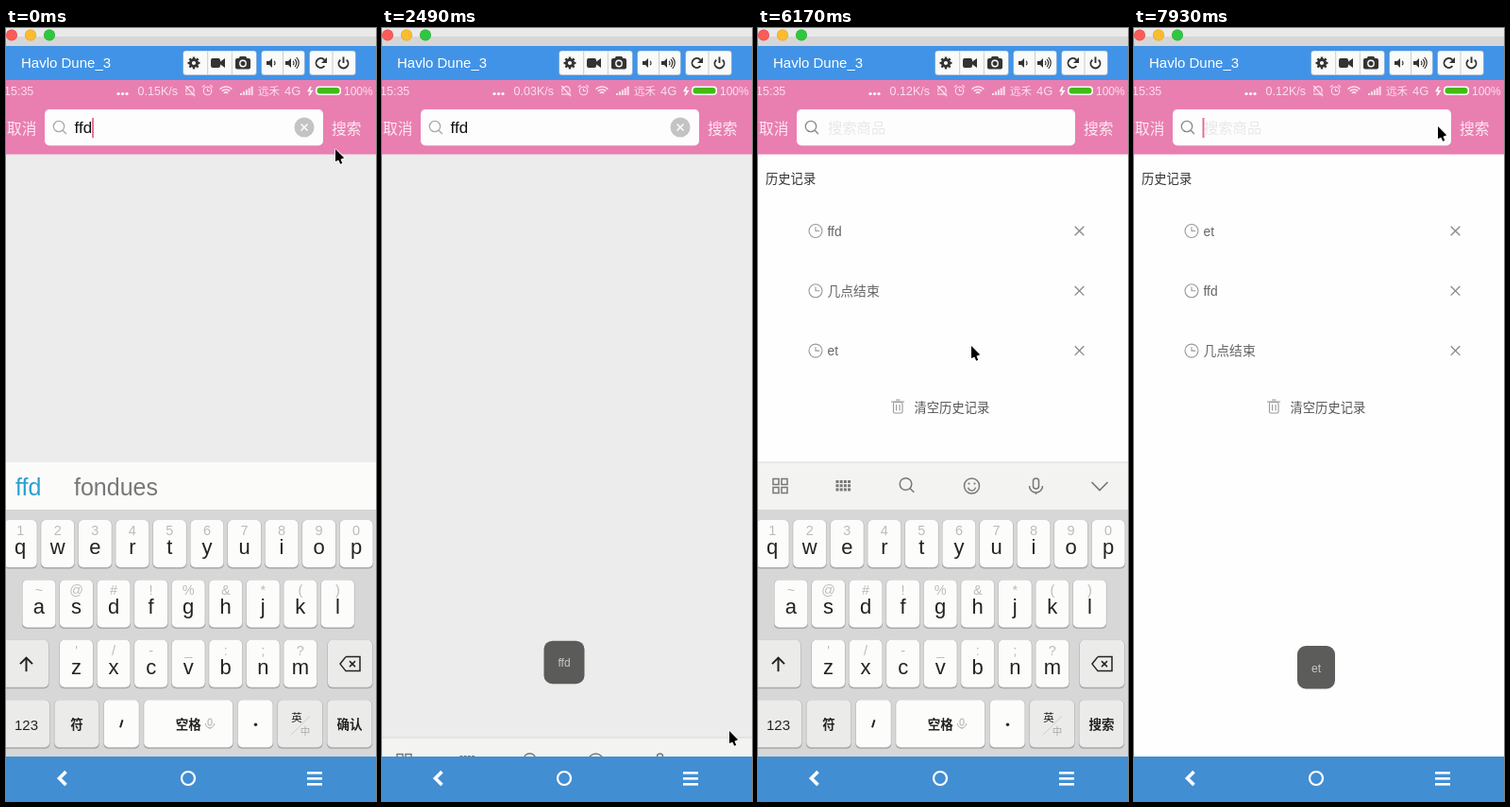
An HTML page with a canvas for the animation above (8 s loop, 392 by 817 pixels).

```html
<!DOCTYPE html>
<html lang="zh">
<head>
<meta charset="utf-8">
<title>Phone search</title>
<style>
html, body { margin: 0; width: 100%; height: 100%; overflow: hidden; background: #ececec; }
canvas { display: block; }
</style>
</head>
<body>
<canvas id="stage" width="392" height="817"></canvas>
<script>
const c = document.getElementById('stage').getContext('2d');
const FONT = '"Liberation Sans", "Noto Sans CJK SC", "Noto Sans CJK", sans-serif';
const LOOP = 8000, STEP = 146.8;   // the screen refreshes once per step

// Steps at which something is pressed
const COMMIT = 9, SUBMIT = 16, CLEAR = 29, PICK = 44, CLEAR_AGAIN = 53;

// ---------- helpers ----------
// Smooth 0..1 progress of k through a span of steps
function ease(k, from, span) {
  const u = Math.min(1, Math.max(0, (k - from) / span));
  return u * u * (3 - 2 * u);
}
function rect(x, y, w, h, color, r = 0) {
  c.beginPath();
  c.roundRect(x, y, w, h, r);
  c.fillStyle = color;
  c.fill();
}
function outline(x, y, w, h, color, width, r = 0) {
  c.beginPath();
  c.roundRect(x, y, w, h, r);
  c.strokeStyle = color;
  c.lineWidth = width;
  c.stroke();
}
function text(s, x, y, size, color, align = 'left', weight = 400) {
  c.font = `${weight} ${size}px ${FONT}`;
  c.textAlign = align;
  c.fillStyle = color;
  c.fillText(s, x, y);
}
function line(color, width, ...p) {
  c.beginPath();
  for (let i = 0; i < p.length; i += 2) c.lineTo(p[i], p[i + 1]);
  c.strokeStyle = color;
  c.lineWidth = width;
  c.stroke();
}
function poly(color, ...p) {
  c.beginPath();
  for (let i = 0; i < p.length; i += 2) c.lineTo(p[i], p[i + 1]);
  c.fillStyle = color;
  c.fill();
}
function dot(x, y, r, color) {
  c.beginPath();
  c.arc(x, y, r, 0, 7);
  c.fillStyle = color;
  c.fill();
}
// Arc centred on the direction `mid`, in degrees
function arc(x, y, r, color, width, mid = 0, sweep = 360) {
  const rad = Math.PI / 180;
  c.beginPath();
  c.arc(x, y, r, (mid - sweep / 2) * rad, (mid + sweep / 2) * rad);
  c.strokeStyle = color;
  c.lineWidth = width;
  c.stroke();
}
function cross(x, y, r, color, width) {
  for (const s of [r, -r]) line(color, width, x - r, y - s, x + r, y + s);
}
function magnifier(x, y, r, color, width) {
  arc(x, y, r, color, width);
  line(color, width, x + r * .7, y + r * .7, x + r * 1.4, y + r * 1.4);
}
function mic(x, y, s, color, width) {
  outline(x - 3 * s, y - 8 * s, 6 * s, 11 * s, color, width, 3 * s);
  arc(x, y, 7 * s, color, width, 90, 180);
  line(color, width, x, y + 7 * s, x, y + 9 * s);
}
function clock(x, y, r, color) {
  arc(x, y, r, color, 1.1);
  line(color, 1.1, x, y - r * .6, x, y, x + r * .6, y);
}

// ---------- window frame ----------
function gear(x, y, color) {
  arc(x, y, 3.6, color, 3);
  for (let a = 0; a < 360; a += 45) arc(x, y, 5.4, color, 2.2, a, 24);
}
function speaker(x, y, color, ...waves) {
  rect(x, y - 2, 4, 4, color);
  poly(color, x + 1, y, x + 6, y - 5, x + 6, y + 5);
  for (const r of waves) arc(x + 6, y, r, color, 1.2, 0, 92);
}
function buttonGroup(x, w, count) {
  rect(x - .5, 24, w + 1, 26, '#b9c8d8', 3);
  rect(x, 24.5, w, 24.5, '#fafafa', 3);
  for (let i = 1; i < count; i++) rect(x + w * i / count - .5, 24.5, 1, 24.5, '#ccc');
}
function titleBar() {
  const ink = '#333', y = 37;
  rect(0, 0, 392, 10, '#e9e9e9');
  rect(0, 9, 392, 10, '#d6d6d6');
  ['#fc5b57', '#fdbc30', '#2dc83f'].forEach((color, i) => {
    dot(6 + 20 * i, 7.5, 6, color);
    arc(6 + 20 * i, 7.5, 5.7, 'rgba(0,0,0,.12)', .8);
  });
  rect(0, 19, 392, 36, '#4193e7');
  text('Havlo Dune_3', 16, 42, 15, '#fff');
  buttonGroup(188, 77, 3);
  buttonGroup(271, 45, 2);
  buttonGroup(322, 48, 2);

  gear(199, y, ink);
  rect(217, y - 5, 10, 10, ink, 2);
  poly(ink, 225, y, 232, y - 5, 232, y + 5);
  rect(243, y - 5, 16, 11.5, ink, 2);
  rect(247, y - 7, 8, 4, ink, 1.5);
  arc(251, y + .5, 3.2, '#fafafa', 1.4);
  speaker(276, y, ink, 3);
  speaker(296, y, ink, 3, 5.7, 8.2);
  arc(333.5, y, 5, ink, 1.9, 180, 280);
  poly(ink, 340, y - 6, 340, y, 334, y);
  arc(357.5, y + .5, 5, ink, 1.9, 90, 280);
  line(ink, 1.9, 357.5, y - 6.5, 357.5, y);
}
function navBar() {
  rect(0, 770, 392, 47, '#428ed2');
  line('#fff', 3.6, 63.5, 786, 56.5, 793, 63.5, 800);
  arc(193, 793, 7, '#fff', 2.2);
  for (let i = -1; i < 2; i++) rect(319, 792 + i * 6, 16, 2.6, '#fff');
}

// ---------- phone header ----------
function statusBar(speed) {
  const w = '#fbdfec';
  text('15:35', -2, 71, 12.5, w);
  for (let i = 0; i < 3; i++) dot(119 + i * 4.5, 69.5, 1.6, '#fff');
  text(speed + 'K/s', 182, 71, 12.5, w, 'right');
  arc(195, 66, 4.2, w, 1.2, -90, 240);
  line(w, 1.2, 190, 70, 200, 70);
  line(w, 1.2, 190, 61, 200, 72);
  clock(213.5, 66.5, 4.3, w);
  for (const tilt of [-130, -50]) arc(213.5, 66.5, 6.6, w, 1.2, tilt, 30);
  for (let r = 0; r < 10; r += 3) arc(233, 71, r, w, 1.7, -90, 90);
  for (let i = 0; i < 5; i++) rect(248 + i * 2.9, 69 - i * 1.8, 2, 2 + i * 1.8, w);
  text('远禾', 267, 70.5, 11.5, w);
  text('4G', 295, 71, 13, w);
  line('#fff', 1.6, 323, 62, 320.5, 66.5, 324, 66.5, 321, 71);
  rect(328, 61.5, 27, 9.5, '#fff', 4);
  rect(329.5, 63, 24, 6.5, '#43bb13', 3);
  text('100%', 358, 71, 12, w);
}
function header({ speed, query, caret }) {
  rect(0, 55, 392, 78.5, '#e97fb1');
  statusBar(speed);
  text('取消', 1, 111.5, 15.7, '#fde9f2');
  text('搜索', 345, 111.5, 15.7, '#fde9f2');
  rect(41, 86, 295, 38.3, '#fdfdfd', 5);
  magnifier(56, 104, 5.7, query ? '#aaa' : '#888', 1.3);
  text(query, 72.5, 111, 17, '#111');
  const end = 73 + c.measureText(query).width;
  if (query) {
    dot(316, 105, 10.5, '#c3c3c3');
    cross(316, 105, 3.5, '#fff', 1.4);
  } else {
    text('搜索商品', 74, 111, 15.3, '#e8e8e8');
  }
  if (caret) rect(end - .5, 95, 2, 21, '#e0709f');
}

// ---------- history page ----------
function history(items) {
  const ink = '#999';
  rect(0, 133.5, 392, 637, '#fefefe');
  text('历史记录', 8, 163.5, 13.3, '#333');
  items.forEach((s, i) => {
    const y = 214.5 + i * 63.3;
    clock(61, y, 7, ink);
    text(s, 73.5, y + 5, 13.8, '#666');
    cross(340.5, y, 4.8, '#888', 1.3);
  });
  outline(143.5, 395.5, 9.5, 11.5, ink, 1.1, 1.5);
  rect(141, 394.5, 14, 1.1, ink);
  rect(146, 392.5, 4.5, 1.1, ink);
  for (const x of [146, 149.5]) rect(x, 398, 1.1, 6.5, ink);
  text('清空历史记录', 165.5, 405.5, 13.3, '#555');
}
function pastePopup() {
  rect(-5, 133, 166, 65, '#f4f4f4', 9);
  rect(-5, 134, 161, 60, '#e9e9e9', 7);
  rect(0, 137, 151, 52, '#fdfdfd', 4);
  rect(68, 137, 1, 52, '#bbb');
  text('粘贴', 34, 168, 13.3, '#333', 'center', 700);
  text('常用语', 110, 168, 13.3, '#333', 'center', 700);
}

// ---------- keyboard ----------
const PITCH = 39.55;
const ROWS = [
  ['qwertyuiop', '1234567890', 0],
  ['asdfghjkl', '~@#!%&*()', .5],
  ['zxcvbnm', "'/-_:;?", 1.5]
];
const rowTop = i => 520 + i * 63.4;

function key(x, y, w, special) {
  rect(x - .5, y, w + 1, 51.5, '#a9a9a9', 5);
  rect(x, y, w, 50, special ? '#ebecea' : '#fcfdfb', 5);
}
function toolStrip() {
  const g = '#777', y = 484;
  rect(0, 459, 392, 50, '#f3f4f2');
  rect(0, 458.5, 392, 1, '#d9d9d9');
  for (let i = 0; i < 4; i++) outline(16 + i % 2 * 9, y - 7.5 + (i >> 1) * 9, 6, 6, g, 1.5);
  for (let i = 0; i < 12; i++) rect(82.5 + i % 4 * 4.2, y - 6 + (i >> 2) * 4.2, 3, 3, g);
  magnifier(156.5, y - 2, 6.3, g, 1.5);
  arc(226.5, y, 8, g, 1.5);
  arc(226.5, y + 1, 4, g, 1.3, 90, 160);
  for (const side of [-3, 3]) dot(226.5 + side, y - 2.5, 1.1, g);
  mic(294.5, y, 1, g, 1.5);
  line(g, 1.7, 353.5, y - 4, 362, y + 4.5, 370.5, y - 4);
}
function candidates() {
  rect(0, 459, 392, 50, '#fbfcfa');
  text('ffd', 10, 494, 25, '#2c9fd0');
  text('fondues', 72, 494, 25, '#777');
}
function bottomRow(action) {
  const y = rowTop(3), ink = '#222';
  let x = -6;
  // A label of latin or no letters is drawn apart from the bold ones
  for (const [label, w] of [['123', 52], ['符', 47], ['', 37], ['空格', 94], ['', 37], ['', 47], [action, 47]]) {
    const mid = x + w / 2;
    key(x, y, w, w > 40 && w < 60);
    if (label === '123') text(label, 21.5, y + 31.5, 15, ink, 'center');
    else text(label, mid, y + 31, 13.5, ink, 'center', 700);
    x += w + 5.4;
  }
  line(ink, 2, 123.5, y + 21, 121, y + 29);
  mic(216, y + 25, .65, '#aaa', 1);
  dot(264.5, y + 26, 1.7, ink);
  text('英', 308, y + 23, 11.5, ink, 'center');
  line('#ccc', 1, 302, y + 37, 322, y + 17);
  text('中', 317, y + 37, 10.5, '#aaa', 'center');
}
function keyboard(offset, composing) {
  c.save();
  c.translate(0, offset);
  rect(0, 509, 392, 262, '#d7d7d7');
  composing ? candidates() : toolStrip();
  ROWS.forEach(([letters, hints, indent], row) => {
    const y = rowTop(row);
    [...letters].forEach((ch, i) => {
      const x = 15.2 + (i + indent) * PITCH;
      key(x - 17.5, y, 35);
      text(hints[i], x, y + 16, 14.5, '#bbb', 'center');
      text(ch, x, y + 35.7, 22, '#222', 'center');
    });
  });
  const y = rowTop(2), mid = y + 25.3;
  key(-6, y, 51, true);
  line('#222', 2, 21.5, mid + 8, 21.5, mid - 6);
  line('#222', 2, 15, mid, 21.5, mid - 6.5, 28, mid);
  key(341, y, 47, true);
  line('#222', 1.5, 360, mid - 7.5, 375, mid - 7.5, 375, mid + 7.5, 360, mid + 7.5, 354, mid, 360, mid - 7.5);
  cross(367, mid, 3, '#222', 1.5);
  bottomRow(composing ? '确认' : '搜索');
  c.restore();
}

// ---------- overlays ----------
function toast(label, k, from) {
  const w = label === 'et' ? 40 : 43, y = 638 + 15 * ease(k, from, 2);
  rect(193 - w / 2, y, w, 45.5, 'rgba(84,85,83,.95)', 9);
  text(label, 193, y + 27.5, 12, '#c8c8c8', 'center');
}
// Pointer glides: first step, number of steps, goal
const GLIDES = [
  [0, 7, 354, 738], [COMMIT, 5, 368, 743], [17, 4, 242, 378],
  [21, 6, 319, 104], [CLEAR, 5, 226, 336], [45, 6, 322, 104]
];
function pointer(k) {
  let x = 349, y = 128;
  for (const [from, span, toX, toY] of GLIDES) {
    const e = ease(k, from, span);
    x += (toX - x) * e;
    y += (toY - y) * e;
  }
  c.save();
  c.translate(x, y);
  c.lineJoin = 'round';
  const head = [0, 0, 0, 13, 9.2, 9.2, 0, 0], tail = [3.5, 9, 6.2, 15.3];
  line('#fff', 1.6, ...head);
  line('#fff', 3.6, ...tail);
  poly('#000', ...head);
  line('#000', 2.2, ...tail);
  c.restore();
}

// ---------- whole picture at step k ----------
function draw(k) {
  const listing = (k >= CLEAR && k < PICK) || k >= CLEAR_AGAIN;
  const focus = [CLEAR_AGAIN, PICK, CLEAR, 20, 0].find(n => n <= k);
  const hidden = ease(k, 15.33, 2) - ease(k, 29.3, 1.7) + ease(k, PICK, 2);

  rect(0, 0, 392, 817, '#ececec');
  titleBar();
  if (listing) history(k < PICK ? ['ffd', '几点结束', 'et'] : ['et', 'ffd', '几点结束']);
  header({
    speed: k < 11 ? '0.15' : k < 40 ? '0.03' : '0.12',
    query: listing ? '' : k < CLEAR ? 'ffd' : 'et',
    caret: (k - focus) % 7 < 3
  });
  if (k >= 31 && k < 39) pastePopup();
  keyboard(Math.round(314 * hidden), k < COMMIT);
  if (k >= SUBMIT && k < 31) toast('ffd', k, 15.8);
  if (k >= PICK) toast('et', k, PICK);
  navBar();
  pointer(k);
}

const start = performance.now();
function tick() {
  const t = (performance.now() - start) % LOOP;
  draw(Math.floor((t + 10) / STEP));
  requestAnimationFrame(tick);
}
tick();
</script>
</body>
</html>
```
